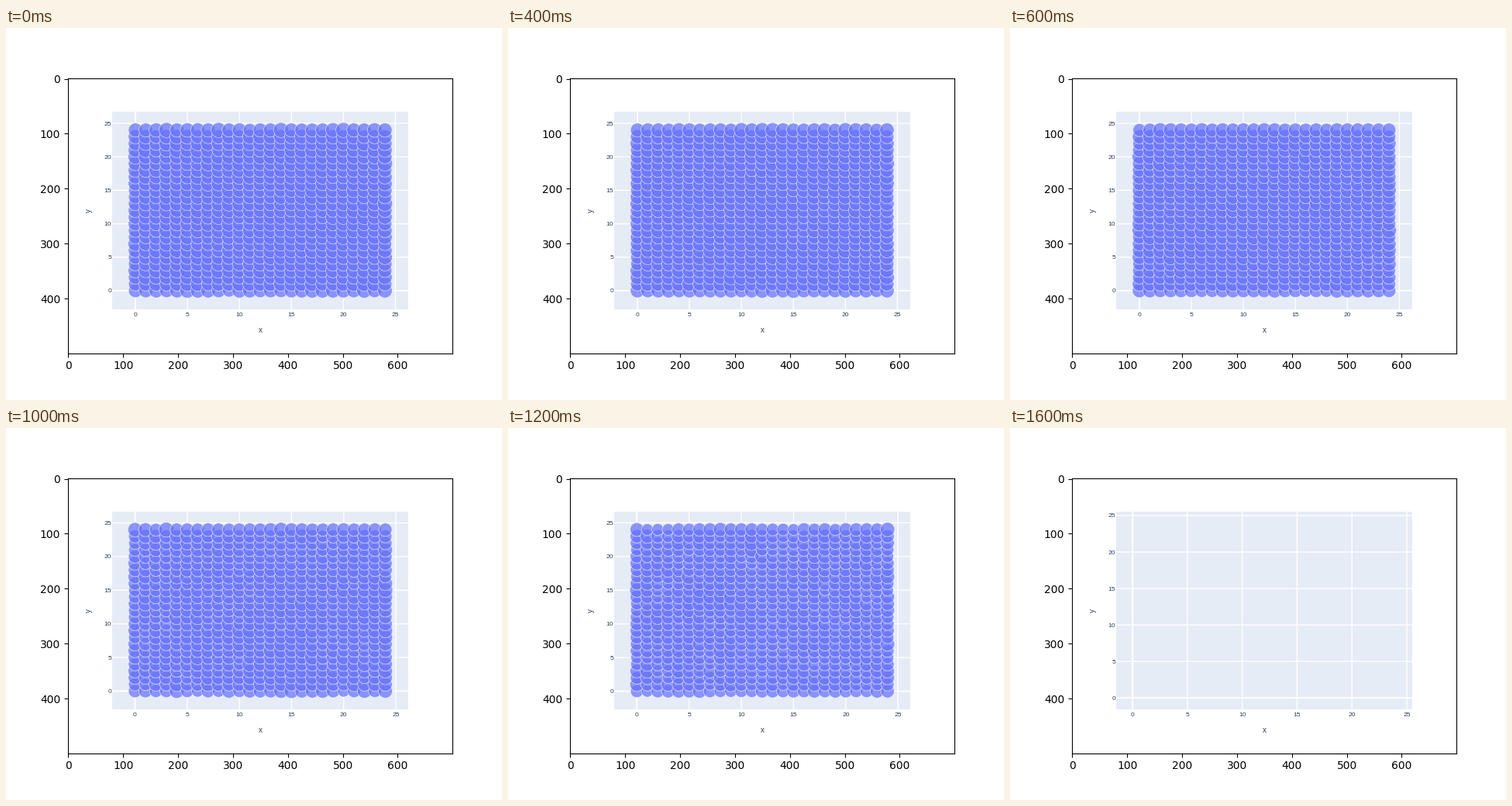
A matplotlib script that plays this animation: 640x480 px, repeating every 8 s.

```python
import numpy as np
import matplotlib.pyplot as plt
from matplotlib.animation import FuncAnimation
from matplotlib.patches import Rectangle

FRAMES, STEP = 40, 200
FILLED = 8                      # frames that still show the bubbles
N = 25
W, H = 700, 500                 # size of the embedded chart
SCALE = 496 / W                 # chart pixel -> stage pixel
PT = 0.72                       # stage pixel -> point
LEFT, RIGHT, TOP, BOTTOM = 79.5, 619.5, 59.5, 419.5
CX, CY = (LEFT + RIGHT) / 2, (TOP + BOTTOM) / 2
TICKS = np.arange(0, 26, 5)
INK = "#2a3f5f"

fig = plt.figure(figsize=(6.4, 4.8), dpi=100, facecolor="white")
ax = fig.add_subplot()
ax.set(xlim=(-0.5, W - 0.5), ylim=(H - 0.5, -0.5), aspect="equal")
ax.set_xticks(range(0, W, 100))
ax.set_yticks(range(0, H, 100))
ax.add_patch(Rectangle((LEFT, TOP), RIGHT - LEFT, BOTTOM - TOP,
                       fc="#E5ECF6", lw=0, zorder=0))


def label(x, y, text, px=12, **kw):
    kw = {"ha": "center", "va": "center_baseline", **kw}
    return ax.text(x, y, text, color=INK, family="Liberation Sans",
                   size=px * SCALE * PT, **kw)


def grid_line(tick):
    width = 1.9 if tick == 0 else 1.35
    return ax.plot([], [], color="white", lw=width * PT, zorder=1,
                   solid_capstyle="butt", snap=False)[0]


label(CX, 456.5, "x", 14)
label(37, CY, "y", 14, rotation=90, va="center")
v_lines = [grid_line(t) for t in TICKS]
h_lines = [grid_line(t) for t in TICKS]
x_labels = [label(0, 429, str(t)) for t in TICKS]
y_labels = [label(LEFT - 1, 0, str(t), ha="right") for t in TICKS]

# column by column, bottom to top, so later bubbles overlap earlier ones
gx, gy = (g.ravel() for g in np.meshgrid(np.arange(N), np.arange(N), indexing="ij"))
dots = ax.scatter(gx, gy, s=1, c="#636efa", alpha=0.7, edgecolors="white",
                  linewidths=SCALE * PT, zorder=2)


def units(n):
    """Chart pixels per unit along x and y."""
    if n >= FILLED:
        return 19.975, 13.28
    k = (n / 7) ** 2 if n > 3 else 0
    return 18.935 + 0.12 * k, 12.19 + 0.11 * k


def radii(n):
    """Random bubble radii that shrink and spread out over time."""
    k = (n / 7) ** 2
    rng = np.random.default_rng(40 + n)
    return np.clip(rng.normal(9.15 - k, 0.25 + 0.25 * k, N * N), 6.8, 9.7)


def draw(n):
    ux, uy = units(n)

    def px(x):
        return CX + (x - 12) * ux

    def py(y):
        return CY - (y - 12) * uy

    for i, t in enumerate(TICKS):
        x, y = px(t), py(t)
        v_lines[i].set_data([x, x], [TOP, BOTTOM])
        h_lines[i].set_data([LEFT, RIGHT], [y, y])
        x_labels[i].set_x(x)
        y_labels[i].set_y(y)

    dots.set_visible(n < FILLED)
    if n < FILLED:
        dots.set_offsets(np.column_stack([px(gx), py(gy)]))
        dots.set_sizes((2 * radii(n) * PT) ** 2)
    return [*v_lines, *h_lines, *x_labels, *y_labels, dots]


anim = FuncAnimation(fig, draw, frames=FRAMES, interval=STEP,
                     repeat=True, repeat_delay=0, blit=False)
plt.show()
```
